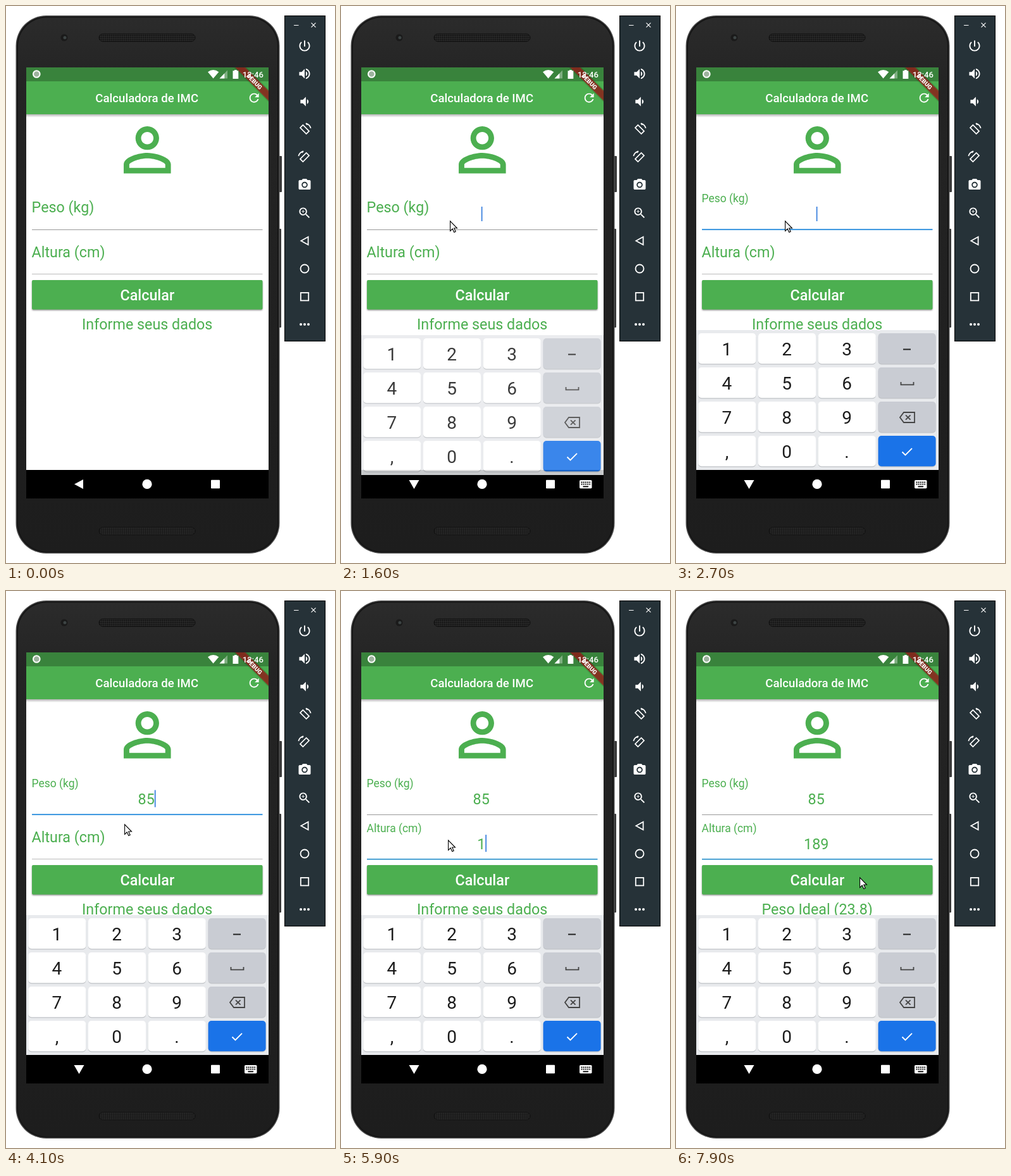
An HTML page for the animation above (8000 ms loop, 520 by 880 pixels).

```html
<!DOCTYPE html>
<html lang="pt">
<head>
<meta charset="utf-8">
<title>Calculadora de IMC</title>
<style>
html, body { margin: 0; width: 100%; height: 100%; overflow: hidden; background: #fff; }
svg { display: block; width: 520px; height: 880px; font-family: Roboto, sans-serif; }
.c { text-anchor: middle; }
.g { fill: #4caf50; font-size: 23.3px; }
.w { fill: #fff; }
.line { fill: none; stroke: #fff; stroke-width: 1.8; }
</style>
</head>
<body>
<svg viewBox="0 0 520 880">
  <defs>
    <linearGradient id="body" x1="0" y1="0" x2="0" y2="1">
      <stop offset="0" stop-color="#2b2b2b"/><stop offset=".12" stop-color="#242424"/><stop offset="1" stop-color="#1d1d1d"/>
    </linearGradient>
    <linearGradient id="fall" x1="0" y1="0" x2="0" y2="1">
      <stop offset="0" stop-opacity=".3"/><stop offset="1" stop-opacity="0"/>
    </linearGradient>
    <pattern id="mesh" width="3" height="3" patternUnits="userSpaceOnUse">
      <rect width="3" height="3" fill="#2c2c2c"/><circle cx="1.5" cy="1.5" r="1.1" fill="#0a0a0a"/>
    </pattern>
    <clipPath id="screen"><rect x="32" y="97" width="383" height="636"/></clipPath>
    <clipPath id="btnClip"><rect x="41" y="433" width="364.5" height="46.5" rx="2"/></clipPath>
    <filter id="soft" x="-10%" y="-30%" width="120%" height="160%"><feGaussianBlur stdDeviation="1.2"/></filter>
  </defs>

  <!-- phone -->
  <rect x="430" y="237" width="6" height="57" rx="1" fill="#3a3a3a"/>
  <rect x="430" y="352" width="5" height="156" rx="1" fill="#3a3a3a"/>
  <rect x="15.5" y="15" width="417" height="850" rx="48" fill="#4b4b4b"/>
  <rect x="17" y="16.5" width="414" height="847" rx="46.5" fill="#151515"/>
  <rect x="19" y="18.5" width="410" height="843" rx="45" fill="url(#body)"/>
  <rect x="147" y="44" width="152" height="12" rx="6" fill="url(#mesh)" stroke="#111"/>
  <rect x="147" y="823.5" width="152" height="12" rx="6" fill="url(#mesh)" stroke="#111"/>
  <circle cx="92" cy="50" r="5.5" fill="#1a1a1a"/><circle cx="93" cy="50" r="2.5" fill="#3d4444"/>

  <!-- app -->
  <g clip-path="url(#screen)">
    <rect x="32" y="97" width="383" height="636" fill="#fff"/>
    <rect x="32" y="171" width="383" height="5" fill="url(#fall)"/>
    <rect x="32" y="97" width="383" height="74" fill="#4caf50"/>
    <rect x="32" y="97" width="383" height="22" fill="#39833c"/>
    <text class="c w" x="222.7" y="152" font-size="18.6" font-weight="500">Calculadora de IMC</text>
    <path class="w" transform="translate(381 134) scale(.932)" d="M17.65 6.35C16.2 4.9 14.21 4 12 4c-4.42 0-7.99 3.58-7.99 8s3.57 8 7.99 8c3.73 0 6.84-2.55 7.73-6h-2.08c-.82 2.33-3.04 4-5.65 4-3.31 0-6-2.69-6-6s2.69-6 6-6c1.66 0 3.14.69 4.22 1.78L13 11h7V4z"/>
    <path fill="#4caf50" fill-rule="evenodd" transform="translate(167.4 171.4) scale(4.66)" d="M12 5.9c1.16 0 2.1.94 2.1 2.1s-.94 2.1-2.1 2.1S9.9 9.16 9.9 8s.94-2.1 2.1-2.1m0 9c2.97 0 6.1 1.46 6.1 2.1v1.1H5.9V17c0-.64 3.13-2.1 6.1-2.1M12 4C9.79 4 8 5.79 8 8s1.79 4 4 4 4-1.79 4-4-1.79-4-4-4zm0 9c-2.67 0-8 1.34-8 4v3h16v-3c0-2.66-5.33-4-8-4z"/>

    <text class="g" id="label0">Peso (kg)</text>
    <text class="g" id="label1">Altura (cm)</text>
    <text class="g c" id="value0" x="221.7" y="337"></text>
    <text class="g c" id="value1" x="221.7" y="407.5"></text>
    <rect id="rule0" x="41" width="364.5"/>
    <rect id="rule1" x="41" width="364.5"/>
    <rect id="caret" width="1.8" fill="#3c82df"/>

    <rect x="41" y="434.5" width="364.5" height="46.5" rx="2" fill="#000" opacity=".4" filter="url(#soft)"/>
    <rect x="41" y="433" width="364.5" height="46.5" rx="2" fill="#4caf50"/>
    <circle id="ripple" cx="291" cy="453" fill="#fff" clip-path="url(#btnClip)"/>
    <text class="c w" x="223.3" y="464.5" font-size="23.3" font-weight="500">Calcular</text>
    <text class="g c" id="result" x="223.2" y="511"></text>

    <g transform="translate(415 97) rotate(45)">
      <rect x="-40" y="26.1" width="80" height="11.2" fill="#000" opacity=".45" filter="url(#soft)"/>
      <rect x="-40" y="26.1" width="80" height="11.2" fill="#b71c1c" opacity=".63"/>
      <text class="c w" y="35.1" font-size="9.5" font-weight="900">DEBUG</text>
    </g>

    <circle cx="48.3" cy="107.5" r="5.3" fill="#9db39e" stroke="#fff" stroke-width="2"/>
    <path class="w" d="M319 104.3Q327.5 97.8 336.3 104.3L327.6 114.5Z"/>
    <path class="w" opacity=".35" d="M350 101.5V114.5H337.5Z"/>
    <path class="w" d="M345.3 106.5V114.5H337.5Z"/>
    <path class="w" d="M358.5 102.3H361V101H364.8V102.3H367.3V115H358.5Z"/>
    <text class="w" x="373.7" y="112.7" font-size="13.1" font-weight="500">12:46</text>
  </g>

  <rect x="32" y="733" width="383" height="45" fill="#000"/>
  <g id="keyboard"><rect x="32" y="512" width="383" height="221" fill="#e8eaed"/></g>
  <g class="w">
    <path id="back"/>
    <circle cx="223" cy="755.4" r="7.6"/>
    <rect x="324" y="748.7" width="14" height="13.6" rx="1"/>
    <g id="imeIcon">
      <rect x="377" y="749" width="19.5" height="13.2" rx="1.6"/>
      <path d="M379.5 752.5H395M379.5 755.7H395" stroke="#000" stroke-width="1.8" stroke-dasharray="1.8 1.2"/>
      <path d="M382.5 759.3H391" stroke="#000" stroke-width="1.8"/>
    </g>
  </g>

  <!-- side panel -->
  <rect x="440.5" y="15.5" width="64" height="514" fill="#263238" stroke="#000"/>
  <path class="line" style="stroke-width:1.2" d="M455 30.5H462.5M482.5 26.7L489.5 33.7M489.5 26.7L482.5 33.7"/>
  <g class="w" id="tools"></g>
  <path class="line" d="M466.3 371L477.6 364.7V377.3Z"/>
  <circle class="line" cx="472" cy="415" r="6.5"/>
  <rect class="line" x="465.8" y="453" width="12.4" height="12.4"/>
  <g class="w"><circle cx="466" cy="503" r="2"/><circle cx="472" cy="503" r="2"/><circle cx="478" cy="503" r="2"/></g>

  <path id="mouse" fill="#fff" stroke="#000" stroke-width="1.1" d="M.6.8V16.4L4.2 13L6.8 18.6L9.2 17.5L6.7 12H11.5Z"/>
</svg>
<script>
const $ = id => document.getElementById(id);
const set = (id, attrs) => { for (const k in attrs) $(id).setAttribute(k, attrs[k]); };

// Side panel icons on a 24 unit grid
const rotate = 'M4.6 9.2L9.2 4.6L19.4 14.8L14.8 19.4ZM14 1.8Q20.5 3.5 22.2 10M14 1.8L16.6 4.4';
const near = 'c0-1.77-1.02-3.29-2.5-4.03v8.05c1.48-.73 2.5-2.25 2.5-4.02z';
const tools = [
  [63, 'M13 3h-2v10h2V3zm4.83 2.17l-1.42 1.42C17.99 7.86 19 9.81 19 12c0 3.87-3.13 7-7 7s-7-3.13-7-7c0-2.19 1.01-4.14 2.58-5.42L6.17 5.17C4.23 6.82 3 9.26 3 12c0 4.97 4.03 9 9 9s9-4.03 9-9c0-2.74-1.23-5.18-3.17-6.83z'],
  [107, 'M3 9v6h4l5 5V4L7 9H3zm13.5 3' + near + 'M14 3.23v2.06c2.89.86 5 3.54 5 6.71s-2.11 5.85-5 6.71v2.06c4.01-.91 7-4.49 7-8.77s-2.99-7.86-7-8.77z'],
  [151, 'M5 9v6h4l5 5V4L9 9H5zm13.5 3' + near],
  [195, rotate, 1],
  [239, rotate, -1],
  [282.5, 'M9 2L7.17 4H4c-1.1 0-2 .9-2 2v12c0 1.1.9 2 2 2h16c1.1 0 2-.9 2-2V6c0-1.1-.9-2-2-2h-3.17L15 2H9zm3 15c-2.76 0-5-2.24-5-5s2.24-5 5-5 5 2.24 5 5-2.24 5-5 5zM12 8.8a3.2 3.2 0 1 0 .01 0z'],
  [327, 'M15.5 14h-.79l-.28-.27C15.41 12.59 16 11.11 16 9.5 16 5.91 13.09 3 9.5 3S3 5.91 3 9.5 5.91 16 9.5 16c1.61 0 3.09-.59 4.23-1.57l.27.28v.79l5 4.99L20.49 19l-4.99-5zm-6 0C7.01 14 5 11.99 5 9.5S7.01 5 9.5 5 14 7.01 14 9.5 11.99 14 9.5 14zM12 10h-2v2H9v-2H7V9h2V7h1v2h2v1z']
];
$('tools').innerHTML = tools.map(([y, d, flip]) =>
  `<path ${flip ? 'class="line"' : ''} transform="translate(472 ${y}) scale(${.95 * (flip || 1)} .95) translate(-12 -12)" d="${d}"/>`).join('');

// Keyboard
const icons = [
  '<path d="M359 542.5H371" stroke="#222" stroke-width="2"/>',
  '<path d="M355.5 594V598.3H375.5V594" fill="none" stroke="#444" stroke-width="1.8"/>',
  '<path d="M360 642H377V658H360L354 650ZM363 646.3L370.5 653.7M370.5 646.3L363 653.7" fill="none" stroke="#444" stroke-width="1.8"/>',
  '<path d="M357.5 704.5L362.5 709.5L373 698.8" fill="none" stroke="#fff" stroke-width="1.9"/>'
];
const keys = ['123', '456', '789', ',0.'];
keys.forEach((row, r) => {
  for (let c = 0; c < 4; c++) {
    const x = 35.2 + c * 94.8, y = 517 + r * 54;
    const fill = c < 3 ? '#fff' : r < 3 ? '#c9ccd3' : '#1a73e8';
    const box = (dy, f) => `<rect x="${x}" y="${y + dy}" width="91" height="48.3" rx="5" fill="${f}"/>`;
    $('keyboard').innerHTML += box(1.2, '#bfc2c6') + box(0, fill) + (c < 3
      ? `<text class="c" x="${x + 45.2}" y="${y + 35.3}" font-size="28" fill="#1c1c1c">${row[c]}</text>` : icons[r]);
  }
});

// Step tables: [time, ...values]
const path = [[500, 447, 346], [600, 385, 345], [700, 292, 343], [800, 210, 340], [900, 172, 339],
  [3500, 172, 339], [3900, 187, 368], [4200, 187, 368], [4500, 169, 393],
  [6500, 169, 393], [6600, 188, 403], [6900, 272, 438], [7000, 286, 450], [7100, 290, 452]];
const slide = [[1300, 80, 0], [1400, 46, .3], [1500, 22, .65], [1600, 8, .86], [1700, 0, 1]];
const weight = [[0, ''], [3300, '8'], [3700, '85']];
const height = [[0, ''], [5900, '1'], [6100, '18'], [6400, '189']];
const result = [[0, 'Informe seus dados'], [7600, 'Peso Ideal (23.8)']];
const blink = [[0, 0], [1500, 1], [2000, 0], [2500, 1], [3000, 0], [3300, 1], [4200, 0], [4700, 1],
  [5500, 0], [5900, 1], [6900, 0], [7400, 1], [7900, 0]];

const hold = (steps, t) => steps.filter(s => s[0] <= t).pop()[1];
const clamp = v => Math.max(0, Math.min(1, v));
function tween(steps, t) {
  const i = steps.findIndex(s => s[0] > t);
  if (i < 0) return steps[steps.length - 1].slice(1);
  if (!i) return steps[0].slice(1);
  const a = steps[i - 1], b = steps[i], p = (t - a[0]) / (b[0] - a[0]);
  return a.slice(1).map((v, k) => v + (b[k + 1] - v) * p);
}

function field(n, lift, focused, text) {
  const top = n * 70.6;
  set('label' + n, { transform: `translate(40.6 ${326 + top - 16 * lift}) scale(${1 - lift / 4})` });
  set('rule' + n, focused
    ? { y: 352.2 + top, height: 1.9, fill: n ? '#3d9ad0' : '#2f90de' }
    : { y: 353 + Math.floor(top), height: 1, fill: n ? '#bbb' : '#999' });
  $('value' + n).textContent = text;
}

function draw(t) {
  const kg = hold(weight, t), cm = hold(height, t);
  const second = t >= 4900, first = t >= 1700 && !second;
  field(0, clamp((t - 1600) / 300), first, kg);
  field(1, clamp((t - 4800) / 300), second, cm);

  const text = second ? cm : kg;
  set('caret', {
    x: 221.7 + text.length * 6.55,
    y: (text ? 314.5 : 317) + (second ? 70.6 : 0),
    height: text ? 27 : 23,
    opacity: hold(blink, t)
  });

  const [dy, alpha] = tween(slide, t), open = t >= 1400;
  set('keyboard', { transform: `translate(0 ${dy})`, opacity: alpha });
  set('back', { d: open ? 'M107.5 749H123.5L115.5 763Z' : 'M108 755.4L122 748V763Z' });
  set('imeIcon', { opacity: +open });

  const [x, y] = tween(path, t);
  set('mouse', { transform: `translate(${x} ${y})`, opacity: +(t >= 500) });

  const p = clamp((t - 7300) / 500);
  set('ripple', { r: 150 * p, opacity: .22 * Math.min(1, 2 - 2 * p) });
  $('result').textContent = hold(result, t);
}

const start = performance.now();
function loop(now) {
  draw(Math.floor(Math.max(0, now - start) % 8000 / 100) * 100);
  requestAnimationFrame(loop);
}
draw(0);
requestAnimationFrame(loop);
</script>
</body>
</html>
```
